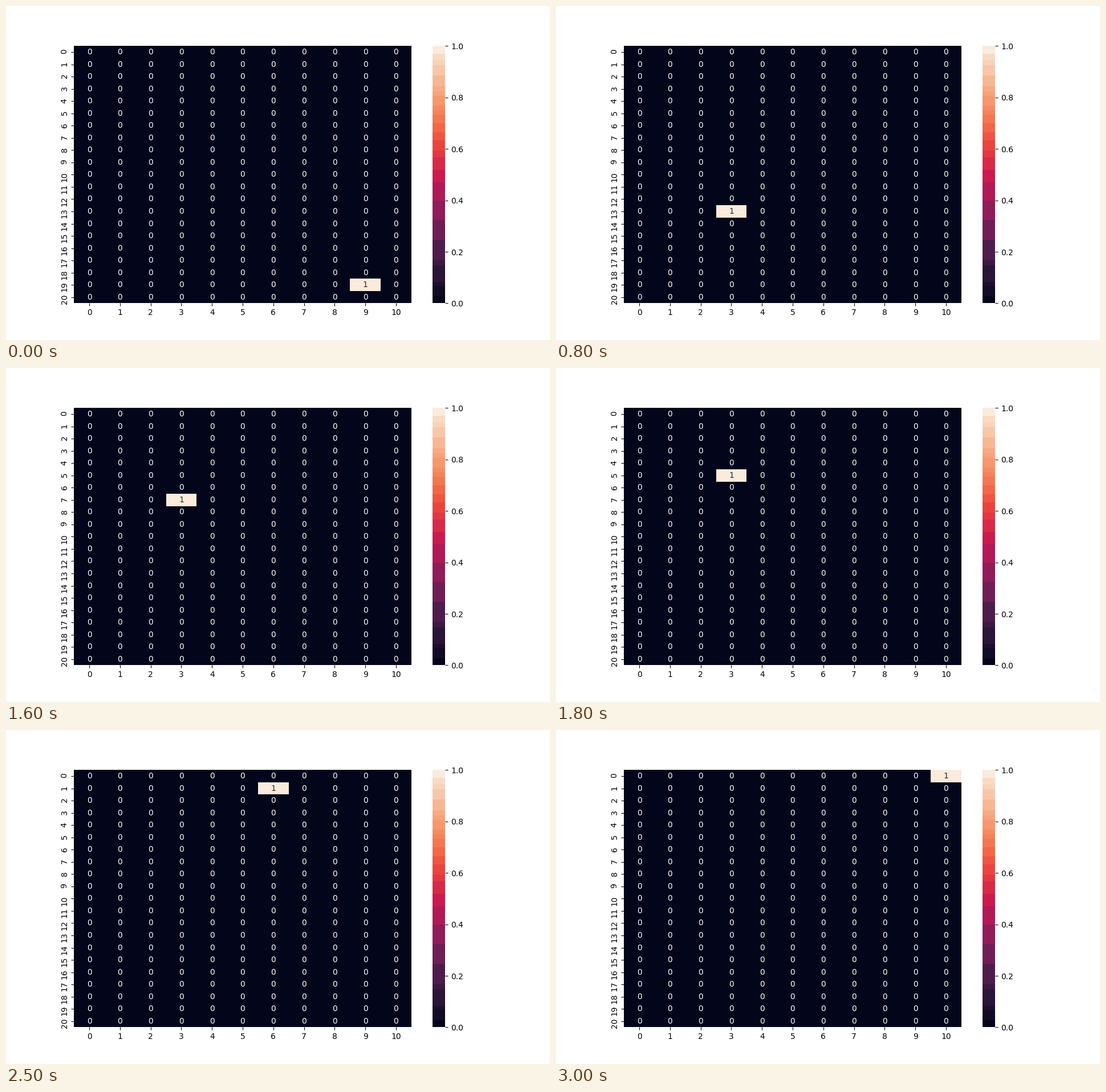
Write a matplotlib script that moves like this. It is 954 by 587 pixels and loops after 3100 ms.

```python
import numpy as np
import matplotlib.pyplot as plt
from matplotlib.animation import FuncAnimation
from matplotlib.colors import LinearSegmentedColormap

WIDTH, HEIGHT, DPI = 954, 587, 100
ROUND_UP = 1e-4  # keeps the pixel size from being truncated
ROWS, COLS = 21, 11
START = (19, 9)
STEPS = {"D": (-1, -1), "U": (-1, 0), "L": (0, -1), "R": (0, 1)}
MOVES = "DDDDULULUULUUUURUUURUURURRRURR"
LIGHT, DARK = "white", "0.15"

ROCKET = [
    (0, "#03051a"), (1 / 7, "#35193e"), (0.2, "#4c1d4b"), (0.25, "#611f53"),
    (1 / 3, "#841e5a"), (0.4, "#a11a5b"), (0.5, "#cb1b4f"), (0.6, "#e83f3f"),
    (2 / 3, "#f06043"), (0.75, "#f4875e"), (0.8, "#f69c73"),
    (6 / 7, "#f6b48f"), (1, "#faebdd"),
]
# Heights in pixels at which the colour bar changes tone
BAND_EDGES = [0, 12, 30, 37, 66, 76, 111, 146, 180, 212, 234, 256, 268, 286,
              300, 316, 331, 339, 347, 364, 372, 381, 400, 418, 427, 438, 452]

plt.rcParams["font.family"] = "DejaVu Sans"
rocket = LinearSegmentedColormap.from_list("rocket", ROCKET)


def walk():
    cells = [START]
    for move in MOVES:
        row, col = cells[-1]
        dr, dc = STEPS[move]
        cells.append((row + dr, col + dc))
    return cells


def hide_spines(ax):
    for spine in ax.spines.values():
        spine.set_visible(False)


def draw_color_bar(fig, left, bottom, height):
    width = height * HEIGHT / 20 / WIDTH
    ax = fig.add_axes([left, bottom, width, height])
    edges = np.array(BAND_EDGES) / BAND_EDGES[-1]
    tones = (edges[:-1] + edges[1:]) / 2
    tones[0], tones[-1] = 0, 1
    ax.pcolormesh([0, 1], edges, tones[:, None], cmap=rocket, vmin=0, vmax=1)
    ax.set_xticks([])
    ax.set_yticks(np.linspace(0, 1, 6))
    ax.set_ylim(0, 1)
    ax.yaxis.tick_right()
    hide_spines(ax)


fig = plt.figure(figsize=((WIDTH + ROUND_UP) / DPI, (HEIGHT + ROUND_UP) / DPI),
                 dpi=DPI)
ax = fig.add_axes([0.125, 0.11, 0.62, 0.77])
mesh = ax.pcolormesh(np.zeros((ROWS, COLS)), cmap=rocket, vmin=0, vmax=1)
ax.set_xlim(0, COLS)
ax.set_ylim(ROWS, 0)
ax.set_xticks(np.arange(COLS) + 0.5, range(COLS))
ax.set_yticks(np.arange(ROWS) + 0.5, range(ROWS), rotation="vertical")
hide_spines(ax)
draw_color_bar(fig, 0.78375, 0.11, 0.77)

labels = {
    (r, c): ax.text(c + 0.5, r + 0.5, "0", color=LIGHT, ha="center", va="center")
    for r in range(ROWS) for c in range(COLS)
}
path = walk()


def update(i):
    grid = np.zeros((ROWS, COLS))
    grid[path[i]] = 1
    mesh.set_array(grid)
    for cell, label in labels.items():
        active = cell == path[i]
        label.set_text("1" if active else "0")
        label.set_color(DARK if active else LIGHT)
    return [mesh, *labels.values()]


anim = FuncAnimation(fig, update, frames=len(path), interval=100,
                     repeat=True, repeat_delay=0, blit=False)
plt.show()
```
